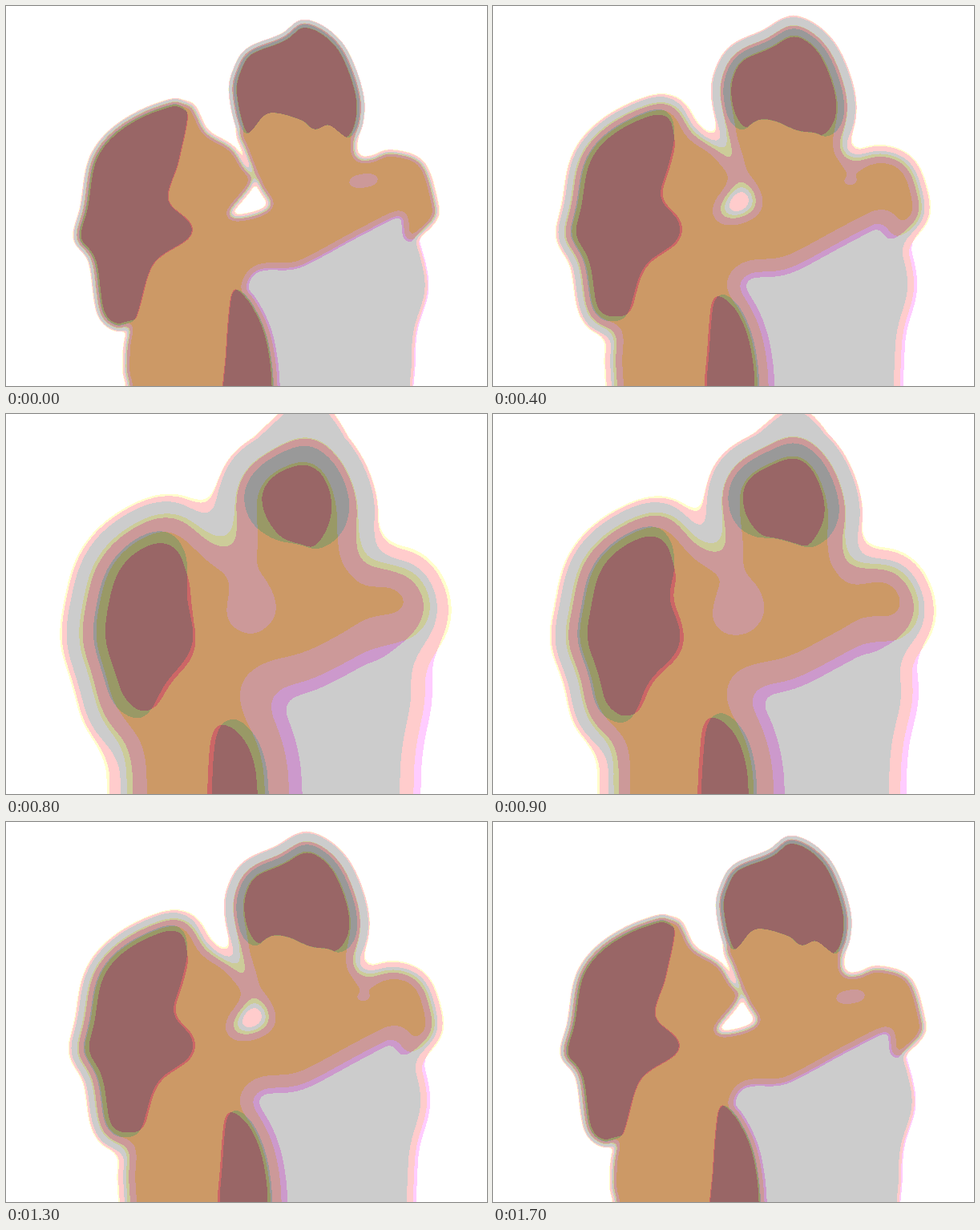
Animation of 600 by 474 pixels, one loop 1800 ms. Source, as an HTML page with a canvas:

```html
<!DOCTYPE html>
<html lang="en">
<head>
<meta charset="utf-8">
<title>Embrace</title>
<style>
html, body { margin: 0; width: 100%; height: 100%; overflow: hidden; background: #fff; }
canvas { display: block; width: 600px; height: 474px; }
</style>
</head>
<body>
<canvas id="stage" width="600" height="474"></canvas>
<script>
const W = 600, H = 474, LOOP = 1800, STEP = 100;
const ctx = document.getElementById('stage').getContext('2d', { willReadFrequently: true });

const SHIRT = 'rgb(221,184,204)';
const SKIN = 'rgb(187,131,102)';
const HER_HAIR = 'rgb(148,109,87)';
const HIS_HAIR = 'rgb(138,112,107)';

// Closed smooth curve through a few key points
function blob(color, text) {
  const pts = text.split(' ').map(p => p.split(',').map(Number));
  const n = pts.length;
  const at = i => pts[(i + n) % n];
  const handle = (i, dir) => at(i).map((v, k) => v + dir * (at(i + 1)[k] - at(i - 1)[k]) / 6);
  ctx.beginPath();
  ctx.moveTo(...at(0));
  for (let i = 0; i < n; i++) {
    ctx.bezierCurveTo(...handle(i, 1), ...handle(i + 1, -1), ...at(i + 1));
  }
  ctx.fillStyle = color;
  ctx.fill();
}

function drawScene() {
  ctx.fillStyle = '#fff';
  ctx.fillRect(0, 0, W, H);

  blob(SHIRT, '295,343 420,285 495,245 513,290 526,350 511,408 506,474 480,540 320,540');

  // Her face, his neck, then the shoulder, hand and arm around to her back
  blob(SKIN, '222,125 250,158 281,177 296,200 307,220 278,260 304,262 330,249 318,226 ' +
    '299,180 294,150 350,100 430,120 435,184 455,191 479,183 518,196 535,245 533,267 ' +
    '503,290 494,258 445,279 368,320 297,346 300,540 200,540 155,474 150,435 155,398 180,250');

  ctx.fillStyle = SHIRT;
  ctx.beginPath();
  ctx.ellipse(446, 218, 18, 5.5, -0.12, 0, Math.PI * 2);
  ctx.fill();

  blob(HER_HAIR, '222,125 190,125 140,151 108,190 97,250 88,290 107,318 120,388 154,396 ' +
    '180,320 229,281 198,243 212,190');
  blob(HER_HAIR, '289,355 305,366 326,410 335,474 330,540 275,540 279,430 284,370');
  blob(HIS_HAIR, '282,108 289,76 304,55 346,38 369,21 398,31 424,60 443,118 434,162 ' +
    '403,143 385,151 372,139 326,129 296,157');
}

// Box blur along one axis, averaging only what lies inside the stage
function boxPass(src, dst, count, stride, lines, lineStride, r) {
  for (let line = 0; line < lines; line++) {
    for (let c = 0; c < 3; c++) {
      const base = line * lineStride + c;
      let sum = 0, size = 0;
      for (let i = -r; i < count; i++) {
        if (i + r < count) { sum += src[base + (i + r) * stride]; size++; }
        if (i > r) { sum -= src[base + (i - r - 1) * stride]; size--; }
        if (i >= 0) dst[base + i * stride] = sum / size;
      }
    }
  }
}

drawScene();
const scene = ctx.getImageData(0, 0, W, H).data;

// Blur twice, then snap every channel to steps of 51
function render(r) {
  const a = Float32Array.from(scene), b = new Float32Array(a.length);
  for (let n = 0; n < 2; n++) {
    boxPass(a, b, W, 4, H, W * 4, r);
    boxPass(b, a, H, W * 4, W, 4, r);
  }
  const image = ctx.createImageData(W, H), out = image.data;
  for (let i = 0; i < out.length; i++) {
    out[i] = i % 4 === 3 ? 255 : Math.round(a[i] / 51) * 51;
  }
  return image;
}

// Softness grows ever faster with the level
const radius = level => Math.round(5 + 1.8 * level + 0.019 * level ** 3);

// Up to the softest level and back, pausing one step on the way down
function levelAt(ms) {
  const step = Math.floor((ms % LOOP) / STEP);
  if (step <= 8) return step;
  return step <= 11 ? 16 - step : 17 - step;
}

const images = [];
let shown = -1;

function show(ms) {
  const level = levelAt(ms);
  if (level === shown) return;
  images[level] = images[level] || render(radius(level));
  ctx.putImageData(images[level], 0, 0);
  shown = level;
}

const start = performance.now();

function tick(now) {
  show(Math.max(0, now - start));
  requestAnimationFrame(tick);
}

show(0);
requestAnimationFrame(tick);
</script>
</body>
</html>
```
